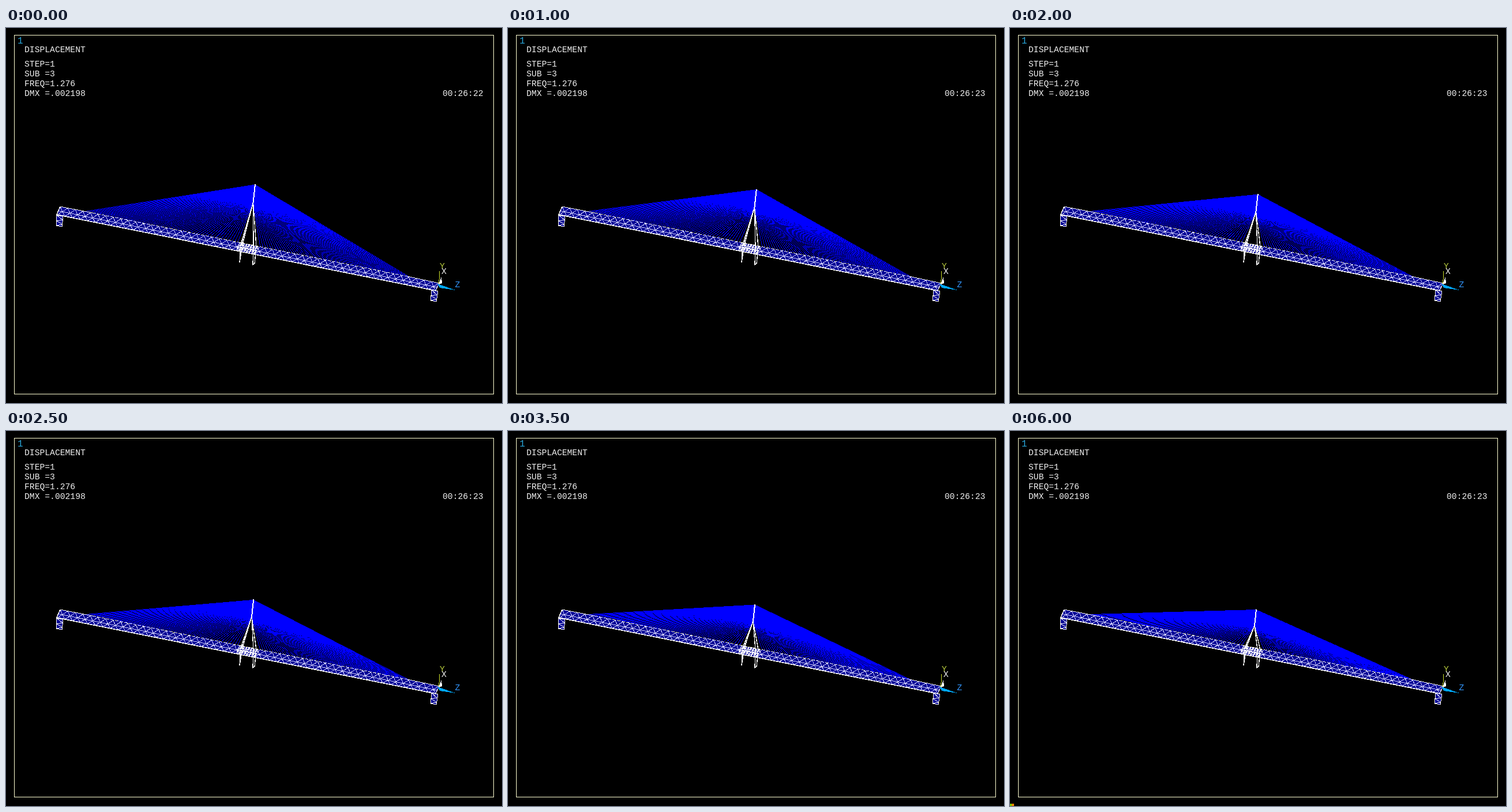
These frames come from a looping animation (860 px wide and 651 px high, 6.5 s). An HTML page:

```html
<!DOCTYPE html>
<html lang="en">
<head>
<meta charset="utf-8">
<title>Bridge mode shape</title>
<style>
  html, body { margin: 0; width: 100%; height: 100%; overflow: hidden; background: #000; }
  svg { display: block; }
  text { font: 14.7px "Liberation Mono", monospace; fill: #f0f0f0; white-space: pre; }
  path, polygon, rect { shape-rendering: crispEdges; }
  .white { fill: none; stroke: #fff; }
  .blue { fill: none; stroke: #00f; }
</style>
</head>
<body>
<svg width="860" height="651" viewBox="0 0 860 651">
  <rect x="14.5" y="12.5" width="831" height="623" fill="none" stroke="#ffffd2"/>
  <text x="20" y="27" style="font-size:16px;fill:#28a8dc">1</text>
  <text x="32" y="42">DISPLACEMENT</text>
  <text x="32" y="67">STEP=1</text>
  <text x="32" y="84">SUB =3</text>
  <text x="32" y="101">FREQ=1.276</text>
  <text x="32" y="118">DMX =.002198</text>
  <text x="757" y="118" id="clock"></text>

  <path id="cables" class="blue"/>

  <polygon points="94,310 751,443 745,456 89,324" fill="#000096"/>
  <path id="truss" class="white" style="stroke:#d4d4ff"/>
  <path class="white" d="M94 310L150 321M695 431L751 443L745 456"/>
  <path class="white" d="M150 321L695 431" stroke-dasharray="6 2"/>
  <path class="white" d="M94 310L88 324L745 456" stroke-width="1.6"/>
  <path id="mesh" class="white"/>

  <g fill="#000096" stroke="#fff">
    <path d="M88 325L99 327L97 345L87 343ZL98 333L88 335L98 341L87 343"/>
    <path d="M738 455L749 457L746 475L736 473ZL747 463L737 465L747 471L736 473"/>
  </g>

  <path id="legs" class="white" stroke-width="1.4"/>
  <path id="rungs" class="white" stroke-width="2" stroke-dasharray="3 2"/>
  <path id="mast" class="white" stroke-width="2"/>

  <path d="M750.5 445L752 422" stroke="#c8dc28"/>
  <path d="M750 445L755 432L756 443Z" fill="#fff"/>
  <path d="M748 444L779 455L752 451Z" fill="#00a8ff"/>
  <text x="752" y="418" style="fill:#b4c83c">Y</text>
  <text x="755" y="427">X</text>
  <text x="778.5" y="450" style="fill:#3296ff">Z</text>

  <g id="corner">
    <rect y="647" width="4" height="4" fill="#78c800"/>
    <rect x="3" y="647" width="4" height="4" fill="#f08200"/>
  </g>
</svg>
<script>
  const STEP = 500, LOOP = 6500, LAST_POSE = 9, CABLES = 56, PANELS = 50;
  const el = id => document.getElementById(id);
  const mix = (a, b, u) => a + (b - a) * u;
  const between = (p, q, u) => [mix(p[0], q[0], u), mix(p[1], q[1], u)];
  const line = (...points) => "M" + points.map(p => p.map(n => n.toFixed(1)).join(" ")).join("L");
  const deckTop = u => between([94, 310], [751, 443], u);
  const deckBottom = u => between([89, 324], [745, 456], u);
  const deckAt = (u, depth) => between(deckTop(u), deckBottom(u), depth);

  function drawDeck() {
    let truss = line(deckAt(0, .55), deckAt(1, .55)), mesh = "";
    for (let i = 0; i < PANELS; i++) {
      const a = i / PANELS, b = (i + 1) / PANELS, middle = deckAt((a + b) / 2, .55);
      truss += line(deckTop(a), middle, deckTop(b)) + line(deckBottom(a), middle, deckBottom(b));
    }
    for (let i = 0; i < 8; i++) {
      const u = mix(.473, .52, i / 7);
      mesh += line(deckTop(u), deckBottom(u), deckTop(u + .006));
    }
    for (const depth of [0, .25, .5, .75]) mesh += line(deckAt(.472, depth), deckAt(.522, depth));
    el("truss").setAttribute("d", truss);
    el("mesh").setAttribute("d", mesh);
  }

  function drawPose(p) {
    const tip = [432 - 5 * p, 271 + 38.5 * p];
    const fork = [428.5 - 4.5 * p, 303 + 35 * p];
    let cables = "";
    for (let i = 0; i < CABLES; i++) {
      const u = i / (CABLES - 1);
      const top = between([tip[0], tip[1] + 1], fork, u);
      cables += line(deckTop(mix(.065, .468, u)), top, deckTop(mix(.922, .528, u)));
    }
    el("cables").setAttribute("d", cables);
    el("mast").setAttribute("d", line(tip, fork));
    el("legs").setAttribute("d",
      line(fork, [407, 376], [405, 407], [410, 376], fork) +
      line(fork, [429, 380], [428, 411], [431, 409], [434, 380], fork));
    el("rungs").setAttribute("d", line(fork, [408.5, 376]));
  }

  let shown = -1;
  function tick() {
    const step = Math.floor(performance.now() % LOOP / STEP);
    if (step !== shown) {
      shown = step;
      drawPose(Math.min(step, LAST_POSE) / LAST_POSE);
      el("clock").textContent = step ? "00:26:23" : "00:26:22";
      el("corner").style.display = step > LAST_POSE ? "" : "none";
    }
    requestAnimationFrame(tick);
  }

  drawDeck();
  tick();
</script>
</body>
</html>
```
